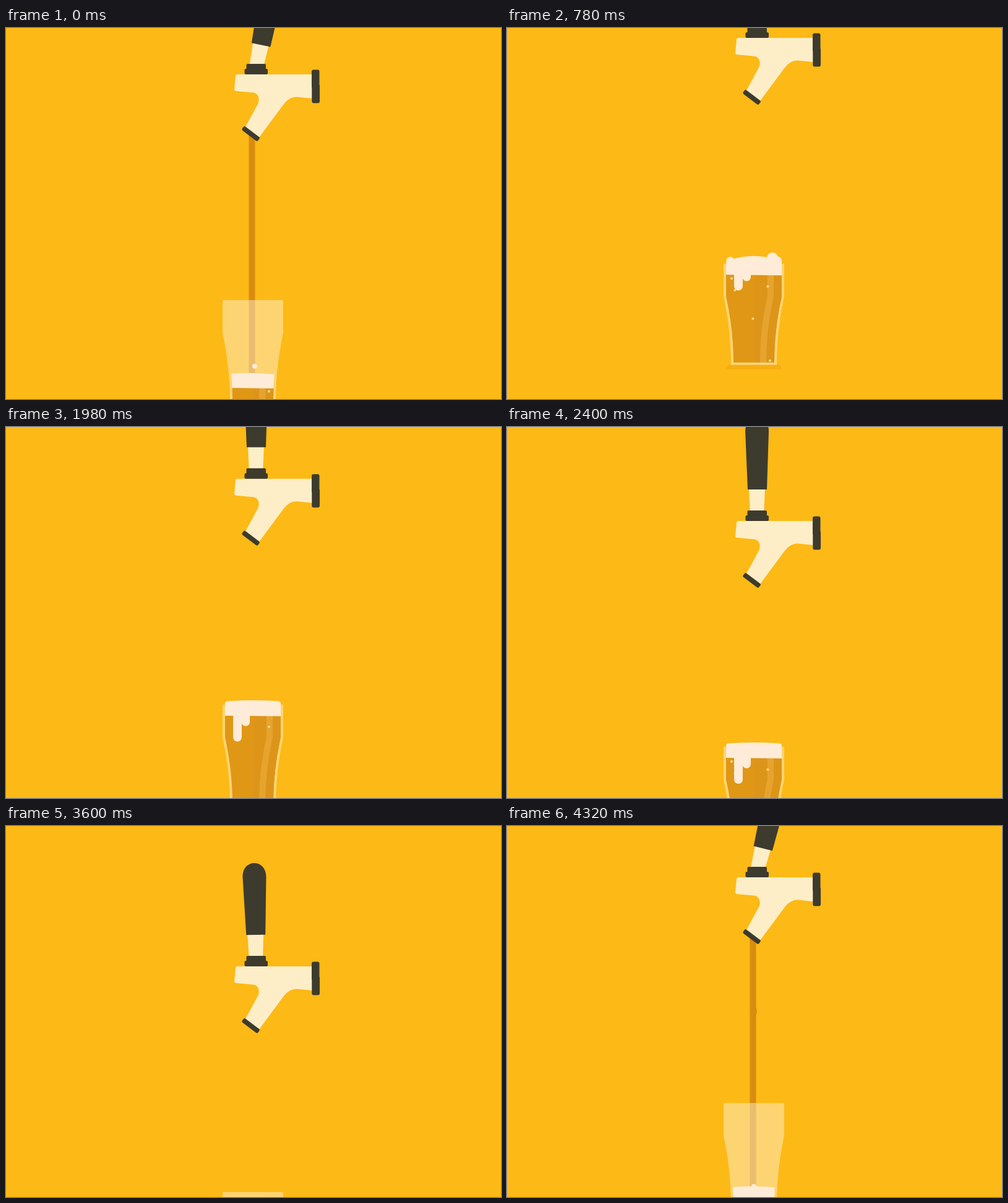
Recreate the animation shown at these times as an HTML page. Size 800 by 600 pixels, loop 4.38 s.

```html
<!DOCTYPE html>
<html lang="en">
<head>
<meta charset="utf-8">
<title>Pouring a beer</title>
<style>
  html, body { margin: 0; width: 100%; height: 100%; overflow: hidden; background: #fdb915; }
  svg { display: block; width: 100vw; height: 100vh; }
  .dark { fill: #3d3b2e; }
  .cream { fill: #fdeec8; }
  .foam { fill: #ffecd8; }
  .stream { fill: #d88c11; }
</style>
</head>
<body>
<svg viewBox="0 0 800 600">
  <defs>
    <clipPath id="inside">
      <path d="M354 330V418Q366 471.5 366 525H432Q432 471.5 444 418V330Z"/>
    </clipPath>
    <clipPath id="inBeer"><rect id="beerClip" x="350" width="98" height="200"/></clipPath>
  </defs>
  <!-- y = 0 in this group is the top of the tap body -->
  <g id="scene">
    <path d="M359 528H439L445 536H353Z" fill="#f3a70f" opacity=".6"/>
    <g class="stream">
      <rect id="stream" x="392.5" width="10"/>
      <ellipse id="lump" cx="400" rx="3.8" ry="8"/>
    </g>

    <g id="handle">
      <path class="cream" d="M391-53H417L415-10H393Z"/>
      <path class="dark" d="M389-51L385-145C385-174.3 423-174.3 423-145L420-51Z"/>
    </g>
    <path class="cream" d="M374 0H495V39L470 36.5Q458 36 449 48L409 102L387 85L407 48C411 40 408 30 399 29.5L372 27Q369 26.5 369 24L371 3Q371 0 374 0Z"/>
    <g class="dark">
      <rect x="388.5" y="-17" width="31.5" height="11" rx="2"/>
      <rect x="385.5" y="-9" width="37.5" height="9" rx="2"/>
      <rect x="494" y="-7.5" width="12.5" height="30" rx="3"/>
      <rect x="494.3" y="16" width="12.7" height="30.5" rx="3"/>
      <rect x="-16" y="-4" width="32" height="8" rx="2.5" transform="translate(395.6 96) rotate(37)"/>
    </g>

    <path fill="#fdf0d0" opacity=".5" d="M352 365H446Q448 365 448 367V418Q436 473 436 529H362Q362 473 350 418V367Q350 365 352 365Z"/>
    <g clip-path="url(#inside)">
      <g clip-path="url(#inBeer)">
        <rect x="350" y="340" width="98" height="190" fill="#e09715"/>
        <rect x="400" y="340" width="48" height="190" fill="#dd9519"/>
        <g id="bubbles" fill="#f8d583"></g>
      </g>
      <path d="M421 366H431V418Q419 470 419 525H409Q409 470 421 418Z" fill="#fdd070" opacity=".25"/>
      <g class="foam">
        <path id="head"/>
        <circle id="puffLeft" cx="361" cy="360.5"/>
        <circle id="puffTop" cx="429" cy="356"/>
        <circle id="puffRight" cx="436" cy="361"/>
        <rect id="dripLong" x="367" y="370" width="14" rx="7"/>
        <rect id="dripShort" x="380.5" y="370" width="13.5" rx="6.7"/>
        <circle id="splash" r="4"/>
      </g>
    </g>
  </g>
</svg>
<script>
const LOOP = 4380, STEP = 60, BUBBLE_LOOP = 810;
const FULL = 383, FOAM = 25;

const $ = id => document.getElementById(id);
const set = (id, attrs) => {
  for (const key in attrs) $(id).setAttribute(key, attrs[key]);
};
const ramp = (t, from, to) => Math.min(1, Math.max(0, (t - from) / (to - from)));
const easeOut = u => 1 - (1 - u) ** 2;

// Smooth periodic curve through [time, value] points.
function curve(points) {
  const n = points.length;
  const at = i => {
    const [t, v] = points[(i + n) % n];
    return [t + LOOP * Math.floor(i / n), v];
  };
  const slope = i => {
    const [t0, v0] = at(i - 1), [t1, v1] = at(i + 1);
    return (v1 - v0) / (t1 - t0);
  };
  return t => {
    let i = n - 1;
    while (points[i][0] > t) i--;
    const [t0, v0] = at(i), [t1, v1] = at(i + 1);
    const d = t1 - t0, u = (t - t0) / d, w = 1 - u;
    return w * w * (1 + 2 * u) * v0 + u * u * (3 - 2 * u) * v1
      + d * u * w * (w * slope(i) - u * slope(i + 1));
  };
}

const cameraY = curve([
  [0, 75], [240, 46], [480, 26], [780, 16], [1080, 14], [1500, 23], [1620, 32],
  [2040, 93], [2400, 152], [2700, 201], [2820, 215], [3240, 243], [3600, 227],
  [3780, 194], [4050, 133], [4320, 83]
]);
const handleAngle = curve([
  [0, 11.3], [150, 4.5], [330, 0], [900, 0], [2000, 0], [3300, 0], [3480, -0.4],
  [3600, -1.1], [3780, 5], [4020, 15.5], [4200, 16], [4320, 13.7]
]);

// x, height and the time at which the bubble is there
const bubbles = [
  [421.5, 402, 780], [397.5, 454, 780], [425, 522, 780], [363, 417, 1500], [368.5, 436, 1500]
].map(([x, y, time]) => {
  const dot = document.createElementNS("http://www.w3.org/2000/svg", "circle");
  dot.setAttribute("cx", x);
  dot.setAttribute("r", 2.1);
  $("bubbles").append(dot);
  return { dot, start: time - (524 - y) / 0.31 };
});

function drawStream(s, foamTop) {
  const head = 95 + 430 * ramp(s, -430, -150) ** 1.5;
  const tail = 95 + 265 * ramp(s, 290, 470) ** 1.5;
  const bottom = Math.min(head, foamTop + 6);
  set("stream", { y: tail, height: s > -430 ? Math.max(0, bottom - tail) : 0 });
  set("lump", { cy: 217 + (s + 60) * 1.6, visibility: s > -130 && s < -5 ? "visible" : "hidden" });
}

function drawFoam(s, top, beerTop) {
  const swell = ramp(s, 380, 560) * (1 - ramp(s, 850, 1300));
  const wave = s < 440 ? Math.cos(s / 70) : 0;
  const left = top + 1.5 + wave, right = top + 1.5 + 2 * wave;
  const crest = top - 1 - 11 * swell;
  set("head", {
    d: `M354 ${beerTop}V${left + 4}Q354 ${left} 359 ${left}Q399 ${crest} 439 ${right}` +
       `Q444 ${right} 444 ${right + 4}V${beerTop + 1}Z`
  });
  set("puffLeft", { r: 6.5 * swell });
  set("puffTop", { r: 9 * swell });
  set("puffRight", { r: 8 * swell });

  const run = easeOut(ramp(s, 480, 1300));
  const visibility = s > 480 ? "visible" : "hidden";
  set("dripLong", { height: 14 + 41 * run, visibility });
  set("dripShort", { height: 14 + 16 * run, visibility });
  set("splash", {
    cx: 399 + 3 * Math.abs(Math.cos(s * Math.PI / 120)),
    cy: top + 1 - 11 * Math.abs(Math.cos(s * Math.PI / 120)),
    visibility: s > -100 && s < 450 ? "visible" : "hidden"
  });
}

function draw(t) {
  // The glass is swapped for an empty one while it is out of view.
  const s = t > 3240 ? t - LOOP : t;
  const beerTop = Math.max(FULL, 507 - 0.285 * s);
  const foamTop = beerTop - FOAM;
  const angle = handleAngle(t);

  set("scene", { transform: `translate(0 ${cameraY(t)})` });
  set("handle", { transform: `translate(0 ${Math.max(0, angle) * 0.22}) rotate(${angle} 404 -12)` });
  set("beerClip", { y: beerTop });
  drawStream(s, foamTop);
  drawFoam(s, foamTop, beerTop);
  for (const { dot, start } of bubbles) {
    const age = (t - start + 2 * BUBBLE_LOOP) % BUBBLE_LOOP;
    dot.setAttribute("cy", 524 - 0.31 * age);
  }
}

const begin = performance.now();
function tick() {
  const t = Math.max(0, performance.now() - begin) % LOOP;
  draw(Math.floor(t / STEP) * STEP);
  requestAnimationFrame(tick);
}
tick();
</script>
</body>
</html>
```
